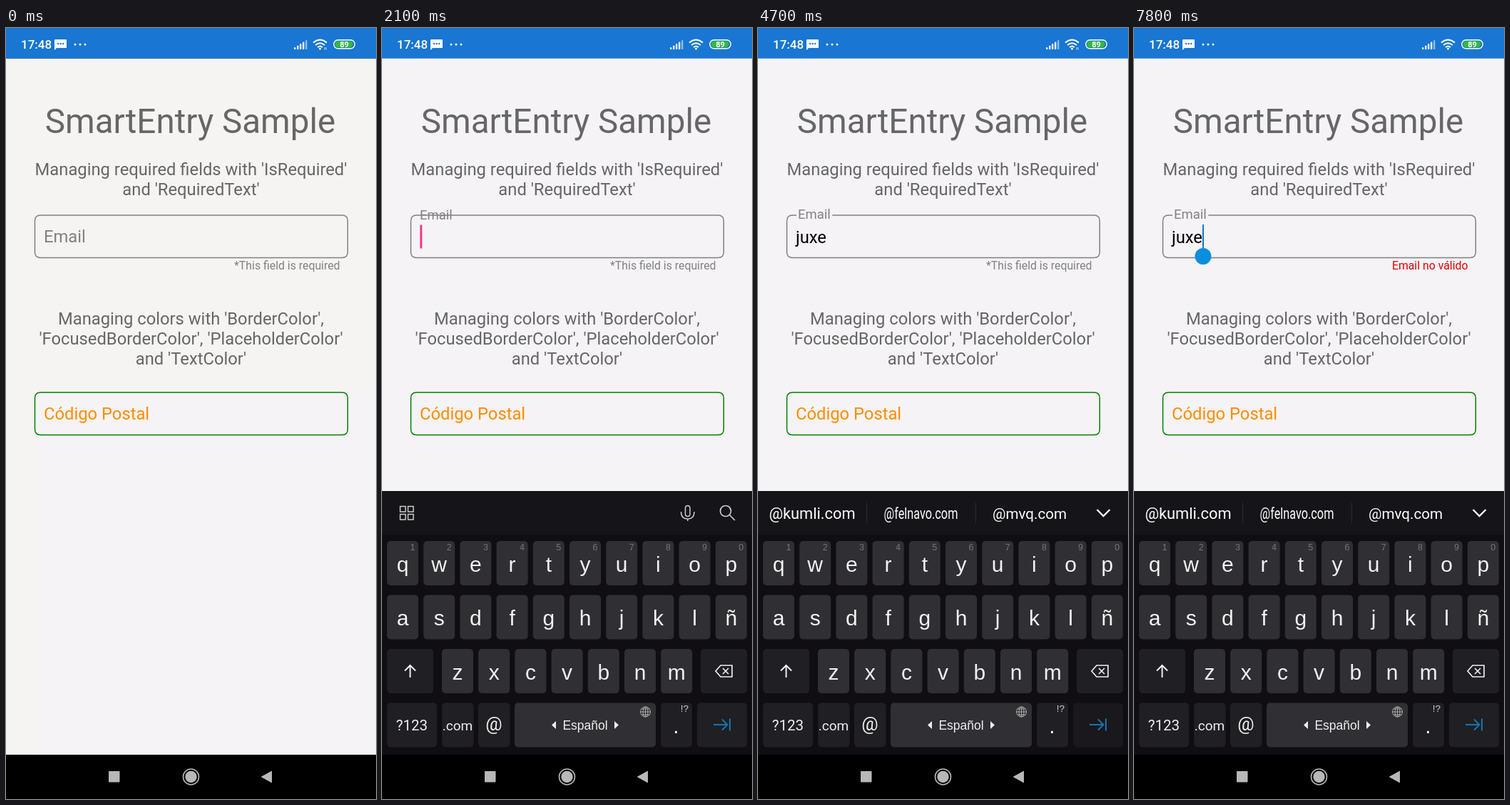
These frames come from a looping animation (519x1079 px, 8 s). An HTML page with a canvas:

```html
<!DOCTYPE html>
<html lang="en">
<head>
<meta charset="utf-8">
<title>Entry fields</title>
<style>
  html, body { margin: 0; width: 100%; height: 100%; overflow: hidden; background: #000; }
  canvas { display: block; width: 519px; height: 1079px; }
</style>
</head>
<body>
<canvas id="stage" width="519" height="1079"></canvas>
<script>
const ctx = document.getElementById('stage').getContext('2d');
const LOOP = 8000;
const DP = 519 / 393;
const ROBOTO = 'Roboto, sans-serif';
const KEY_FONT = '"Liberation Sans", Arial, sans-serif';
const GRAY = '#666666', PAGE = '#f5f3f6', KEY = '#302f34', DARK_KEY = '#201f24', PRESSED = '#1a181d';
const WORD = 'juxe';
const FIRST_PRESS = 3200, PRESS_STEP = 200;

const within = (t, from, to) => t >= from && t < to;

function text(str, x, y, size, color, { align = 'left', font = ROBOTO, weight = 400 } = {}) {
  ctx.font = `${weight} ${size}px ${font}`;
  ctx.textAlign = align;
  ctx.fillStyle = color;
  ctx.fillText(str, x, y);
}
const centered = (str, x, y, size, color, font = ROBOTO) => text(str, x, y, size, color, { align: 'center', font });

function rect(x, y, w, h, color, r = 0) {
  ctx.fillStyle = color;
  ctx.beginPath();
  ctx.roundRect(x, y, w, h, r);
  ctx.fill();
}
function circle(x, y, r, color) {
  ctx.fillStyle = color;
  ctx.beginPath();
  ctx.arc(x, y, r, 0, 7);
  ctx.fill();
}
function stroke(path, color, width = 1.5) {
  ctx.strokeStyle = color;
  ctx.lineWidth = width;
  ctx.stroke(new Path2D(path));
}
function fill(path, color) {
  ctx.fillStyle = color;
  ctx.fill(new Path2D(path));
}

// Status and navigation bars
function statusBar(t) {
  rect(0, 0, 519, 42.5, '#1976d2');
  text('17:48', 21, 29, 17, '#fff', { weight: 500 });
  fill('M69 16H84Q85 16 85 17V27Q85 28 84 28H71L68 31V17Q68 16 69 16Z', '#fff');
  for (const i of [0, 1, 2]) {
    circle(73 + i * 3.6, 22, 1.2, '#1976d2');
    circle(97 + i * 7, 23, 1.5, '#fff');
  }
  for (let i = 0; i < 5; i++) {
    const h = 3 + i * 2.5;
    rect(404 + i * 4, 30 - h, 2.4, h, i < 4 ? '#fff' : '#8fbce9', 1);
  }
  stroke('M431 20.5Q440.500 12.500 450 20.500M434 24Q440.500 18.500 447 24M437 27Q440.500 24 444 27', '#fff', 2);
  circle(440.5, 29, 1.5, '#fff');
  if (t < 1800 || within(t, 4000, 7800)) stroke('M447 27V30.500M449 27V30.500', '#c4dcf4', 1);
  rect(459, 16, 31, 13.5, '#fff', 6.7);
  rect(460.4, 17.4, 28.2, 10.7, '#1976d2', 5.3);
  rect(461.3, 18.3, 25, 9, '#35b83a', 4.5);
  text('89', 474.5, 26.8, 11, '#fff', { align: 'center', weight: 700 });
}
function navBar() {
  rect(0, 1017, 519, 62, '#000');
  rect(144, 1040, 15.5, 15.5, '#b8b8b8', 1);
  circle(259.5, 1048, 8.2, '#b8b8b8');
  ctx.strokeStyle = '#b8b8b8';
  ctx.lineWidth = 1.6;
  ctx.beginPath();
  ctx.arc(259.5, 1048, 11, 0, 7);
  ctx.stroke();
  fill('M357.500 1048L373 1039.500V1056.500Z', '#b8b8b8');
}

// Outlined entry; mode is 'placeholder', 'rising' or 'floating'
function entry(y, label, mode, border, labelColor) {
  const left = 40.5, right = 479.3, bottom = y + 59.6, r = 8;
  let gapEnd = 54;
  if (mode === 'floating') {
    text(label, 56, y + 4.7, 14 * DP, labelColor);
    gapEnd = 56 + ctx.measureText(label).width + 2.5;
  } else if (mode === 'rising') {
    text(label, 53, y + 6, 14 * DP, labelColor);
  } else {
    text(label, 53, y + 38.3, 18 * DP, labelColor);
  }
  stroke(`M${gapEnd} ${y}H${right - r}Q${right} ${y} ${right} ${y + r}V${bottom - r}
    Q${right} ${bottom} ${right - r} ${bottom}H${left + r}Q${left} ${bottom} ${left} ${bottom - r}
    V${y + r}Q${left} ${y} ${left + r} ${y}H54`, border, 1.5);
}

function form(t) {
  rect(0, 42.5, 519, 975, t < 2000 ? '#f5f4f2' : PAGE);
  if (t < 2000) rect(45, 510, 474, 507, PAGE);

  centered('SmartEntry Sample', 258.5, 147, 36 * DP, GRAY);
  [["Managing required fields with 'IsRequired'", 205.7], ["and 'RequiredText'", 233.6],
   ["Managing colors with 'BorderColor',", 415.3], ["'FocusedBorderColor', 'PlaceholderColor'", 443.2],
   ["and 'TextColor'", 471]].forEach(([line, y]) => centered(line, 259.5, y, 18 * DP, GRAY));

  const emailMode = t < 2100 ? 'placeholder' : t < 2200 ? 'rising' : 'floating';
  entry(262, 'Email', emailMode, '#808080', '#808080');

  const postalFocused = within(t, 4800, 6900);
  const postalMode = !within(t, 4900, 6900) ? 'placeholder' : t < 5000 ? 'rising' : 'floating';
  entry(510, 'Código Postal', postalMode, postalFocused ? '#800080' : '#008000',
    postalMode === 'placeholder' ? '#ff8c00' : '#800080');

  const invalid = t >= 4800;
  text(invalid ? 'Email no válido' : '*This field is required', 468.5, 338, 12 * DP,
    invalid ? '#e00000' : '#808080', { align: 'right' });

  const typed = Math.max(0, Math.min(WORD.length, Math.floor((t - FIRST_PRESS - 100) / PRESS_STEP) + 1));
  text(WORD.slice(0, typed), 53, 301, 18 * DP, '#000');
  const caretX = 53 + ctx.measureText(WORD.slice(0, typed)).width;

  if (t >= 6800) {
    if (!within(t, 7300, 7800)) rect(caretX, 275, 2, 36, '#0a78c8');
    if (t >= 6900) {
      circle(caretX + 1, 319.5, 11.5, '#0a8fdd');
      fill(`M${caretX + 1} 307L${caretX + 6} 312H${caretX - 4}Z`, '#0a8fdd');
    }
  } else if (within(t, 4800, 5300) || within(t, 5800, 6300)) {
    rect(53.3, 523.5, 3, 33, '#f03a8c');
  } else if (within(t, 2000, 2500) || within(t, 3000, 4300)) {
    rect(caretX + 0.3, 275.5, 3, 33, '#f03a8c');
  }
}

// Keyboard
function backspace(x) {
  stroke(`M${x - 12} 900L${x - 5} 892H${x + 11}V908H${x - 5}ZM${x - 2} 896L${x + 6} 904M${x + 6} 896L${x - 2} 904`, '#eee', 1.7);
}
function enterArrow(x) {
  stroke(`M${x - 12} 975H${x + 7}M${x} 967.500L${x + 7.5} 975L${x} 982.500M${x + 11} 966.500V983.500`, '#1b74aa', 2);
}

function suggestions(t) {
  rect(0, 648, 519, 61, '#151419');
  if (t < 2200) {
    for (const x of [25.5, 36.5]) for (const y of [669.5, 680.5]) stroke(`M${x} ${y}h7.500v7.500h-7.500z`, '#ccc');
    stroke('M425.500 672Q425.500 668.500 428.800 668.500Q432 668.500 432 672V680Q432 683.500 428.800 683.500Q425.500 683.500 425.500 680ZM419.500 677Q419.500 687 428.800 687Q438 687 438 677M428.800 687V690', '#ccc');
    stroke('M474.500 676a7.500 7.500 0 1 0 15 0a7.500 7.500 0 1 0 -15 0M487.500 681.500L495 689', '#ccc', 1.7);
    return;
  }
  centered('@kumli.com', 76, 687, 21.8, '#fff');
  ctx.save();
  ctx.translate(228.5, 687);
  ctx.scale(0.74, 1);
  centered('@felnavo.com', 0, 0, 22, '#fff');
  ctx.restore();
  centered('@mvq.com', 381, 687, 20.6, '#fff');
  for (const x of [152, 305]) rect(x, 664, 1, 29, '#2d2b31');
  stroke('M475.500 674L484.500 683L493.500 674', '#eee', 2.4);
}

const PITCH = 51.2;
const letterKeys = [['qwertyuiop', 7, 718], ['asdfghjklñ', 7, 793.5], ['zxcvbnm', 84, 869]]
  .flatMap(([row, x, y]) => [...row].map((char, i) => ({ char, x: x + i * PITCH, y })));

function letterPad(t) {
  const index = Math.floor((t - FIRST_PRESS) / PRESS_STEP);
  const pressed = letterKeys.find(key => key.char === WORD[index]);

  letterKeys.forEach((key, i) => {
    rect(key.x, key.y, 44, 62, key === pressed ? PRESSED : KEY, 5);
    centered(key.char, key.x + 22, key.y + 42.5, 30, '#f2f2f2', KEY_FONT);
    if (i < 10) centered((i + 1) % 10, key.x + 36, key.y + 12.5, 12.5, '#77757b', KEY_FONT);
  });

  rect(7, 869, 65, 62, DARK_KEY, 5);
  stroke('M39.500 909V892M32 899.500L39.500 892L47 899.500', '#eee', 2);
  rect(447, 869, 65, 62, DARK_KEY, 5);
  backspace(480);

  const row = 944.5;
  rect(7, row, 70, 62, DARK_KEY, 5);
  centered('?123', 42, 983, 20.5, '#eee');
  rect(84, row, 44.5, 62, DARK_KEY, 5);
  centered('.com', 106, 983, 19, '#eee');
  rect(135, row, 44.5, 62, DARK_KEY, 5);
  centered('@', 157, 983, 26, '#eee');
  rect(186, row, 198, 62, KEY, 5);
  centered('Español', 285, 982, 17.5, '#eee', KEY_FONT);
  fill('M238 975.500L244 970V981ZM332 975.500L326 970V981Z', '#eee');
  stroke('M362.500 957a7 7 0 1 0 14 0a7 7 0 1 0 -14 0M366 957a3.500 7 0 1 0 7 0a3.500 7 0 1 0 -7 0M369.500 950V964M362.500 957H376.500M364 953H375M364 961H375', '#aaa', 1);
  rect(391, row, 44, 62, DARK_KEY, 5);
  centered('.', 412.5, 987, 30, '#eee', KEY_FONT);
  centered('!?', 424.5, 957, 13.5, '#ccc', KEY_FONT);
  rect(442, row, 70, 62, within(t, 4700, 4900) ? PRESSED : DARK_KEY, 5);
  enterArrow(477);

  if (pressed) {
    circle(pressed.x + 22, pressed.y - 46, 37.5, '#222026');
    centered(pressed.char, pressed.x + 22, pressed.y - 33, 35, '#f2f2f2', KEY_FONT);
  }
}

function numberPad() {
  ['123-', '456,', '789<', '.0_>'].forEach((row, r) => [...row].forEach((char, c) => {
    const x = 9 + c * 132.4, y = 715.5 + r * 75, w = c < 3 ? 124.5 : 104, mid = x + w / 2;
    rect(x, y, w, 67.5, c < 3 ? KEY : DARK_KEY, 5);
    if (char === '<') backspace(mid);
    else if (char === '>') enterArrow(mid);
    else if (char === '_') stroke(`M${mid - 9} 970V978H${mid + 9}V970`, '#eee', 2);
    else centered(char, mid, y + 46, 31, '#f2f2f2', KEY_FONT);
  }));
}

function keyboard(t) {
  if (t < 2100) return;
  rect(0, 648, 519, 369, '#100e13');
  suggestions(t);
  if (within(t, 4900, 6900)) numberPad();
  else letterPad(t);
}

function draw(now) {
  const t = now % LOOP;
  form(t);
  statusBar(t);
  keyboard(t);
  navBar();
  requestAnimationFrame(draw);
}
requestAnimationFrame(draw);
</script>
</body>
</html>
```
